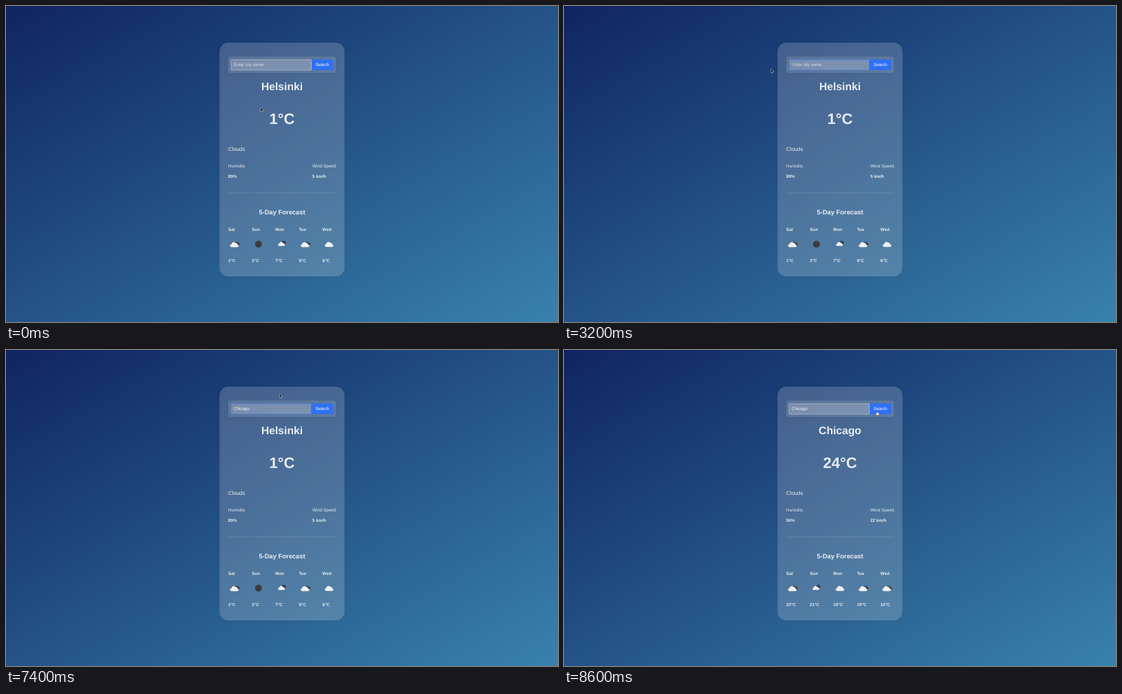
These frames come from a looping animation (800x458 px, 10 s). An HTML page:

```html
<!DOCTYPE html>
<html lang="en">
<head>
<meta charset="utf-8">
<title>Weather search</title>
<style>
  html, body { margin: 0; width: 100%; height: 100%; overflow: hidden; }
  body { background: linear-gradient(to bottom right, #0f2461, #245387 50%, #3882ac); }
  svg { display: block; width: 800px; height: 458px; }
  text {
    font: 6.27px "Liberation Sans", Arial, Helvetica, sans-serif;
    fill: #fff; fill-opacity: .87; text-rendering: geometricPrecision;
  }
  .b { font-weight: 700; }
  .mid { text-anchor: middle; }
  .card { fill: #fff; fill-opacity: .19; }
  .shade { filter: drop-shadow(0 1.6px 3px rgba(0, 0, 0, .13)); }
  .bar { filter: drop-shadow(0 1px 1.5px rgba(0, 0, 0, .28)); }
</style>
</head>
<body>
<svg viewBox="0 0 800 458">
  <defs>
    <path id="puff" d="M-3.9 3.9C-7 3.9-7.2-.1-4.2-.3C-4-3.3-.4-4.4 1.1-2.1C2.8-2.7 4.2-1.4 4-.1C6.8.2 6.5 3.9 3.9 3.9Z"/>
    <g id="cloud"><use href="#puff" fill="#f2f2f2"/></g>
    <g id="broken">
      <use href="#puff" fill="#3c3c40" transform="translate(3 -1.3) scale(.68)"/>
      <use href="#puff" fill="#f2f2f2" transform="translate(-.7 .2)"/>
    </g>
    <g id="few">
      <circle cx="2.6" cy="-2.2" r="2.9" fill="#3c3c40"/>
      <use href="#puff" fill="#f2f2f2" transform="translate(-.7 -.6) scale(.8)"/>
    </g>
    <circle id="clear" r="5" fill="#3c3c40"/>
  </defs>

  <g id="main">
    <rect class="card shade" x="309.5" y="53.3" width="181" height="338.7" rx="12.5"/>
    <rect class="bar" x="322" y="73.3" width="156" height="23.6" rx="3.2" fill="#fff" fill-opacity=".13"/>
    <rect x="326" y="77.7" width="117" height="15.4" rx="1.5" fill="#fff" fill-opacity=".19"/>
    <rect id="edge" x="326" y="77.8" width="116.6" height="15.2" rx="1.5" fill="none" stroke="#fff" stroke-opacity=".5" stroke-width=".7"/>
    <rect id="focus" x="326.3" y="78" width="116" height="14.8" rx="1" fill="none" stroke="#4a7cf2" stroke-width=".7"/>
    <rect id="button" x="443" y="77.6" width="31" height="15.4" rx="1.6" fill="#2f71f4"/>
    <text class="mid" x="458.4" y="87.3" style="fill-opacity:1">Search</text>
    <text id="entry" x="330" y="87.3"></text>
    <rect id="caret" y="81.6" width=".8" height="7.4" fill="#4780f5"/>
    <text x="322" y="210" style="font-size:7.84px">Clouds</text>
    <text x="322" y="233.6">Humidity</text>
    <text x="444" y="233.6">Wind Speed</text>
    <path d="M322 271H478" stroke="#fff" stroke-opacity=".17" stroke-width=".8"/>
    <text class="b mid" x="400" y="301.8" style="font-size:9.4px">5-Day Forecast</text>
  </g>

  <g id="loading">
    <rect class="card shade" x="309.5" y="205.8" width="181" height="34" rx="12.5"/>
    <text x="322" y="224.7">Loading...</text>
  </g>

  <g id="cursor">
    <path id="arrow" d="M0 0V5.3L1.3 4.2L2.2 6.1L3.2 5.6L2.3 3.8L4 3.7Z" fill="#000" stroke="#fff" stroke-width=".45"/>
    <path id="beam" d="M-1.3-4.2Q0-4.2 0-3.4V3.4Q0 4.2-1.3 4.2M1.3-4.2Q0-4.2 0-3.4M0 3.4Q0 4.2 1.3 4.2" fill="none" stroke="#d3d9e4" stroke-width=".5"/>
    <path id="hand" d="M-1-2.7Q-.4-3.4.1-2.6V-.7L2.4-.2Q3.1.1 2.9 1L2.3 3.3H-.8L-2.4.9Q-2.4-.1-1.4.4L-1 .7Z" fill="#fff" stroke="#111" stroke-width=".4"/>
  </g>
</svg>

<script>
const $ = id => document.getElementById(id);
const show = (id, on) => { $(id).style.display = on ? '' : 'none'; };
const clamp = v => Math.min(1, Math.max(0, v));
const ease = v => v * v * (3 - 2 * v);

const LOOP = 10000, STEP = 100;
const WORD = 'Chicago';
const KEYS = [4700, 5100, 5300, 5600, 5900, 6200, 6400];
const FOCUS = 1200, BLUR = 7900, FADE = 300, LOAD = 8400, DONE = 8600;

// start, end, from, control, to
const MOVES = [
  [0, 900, [369, 147.6], [372, 105], [359, 83]],
  [2000, 2600, [359, 83], [328, 84], [300, 91.4]],
  [6700, 7800, [300, 91.4], [350, 25], [454, 91.4]]
];

const DAYS = ['Sat', 'Sun', 'Mon', 'Tue', 'Wed'];
const CITIES = [
  { id: 'before', name: 'Helsinki', temp: 1, humid: 89, wind: 5,
    days: [1, 3, 7, 6, 6], icons: ['broken', 'clear', 'few', 'broken', 'cloud'] },
  { id: 'after', name: WORD, temp: 24, humid: 56, wind: 22,
    days: [22, 21, 15, 19, 10], icons: ['broken', 'few', 'cloud', 'broken', 'broken'] }
];

const bold = (x, y, s) => `<text class="b" x="${x}" y="${y}">${s}</text>`;
const title = (y, size, s) =>
  `<text class="b mid" x="400" y="${y}" style="font-size:${size}px">${s}</text>`;

function cityMarkup(c) {
  const days = DAYS.map((day, i) => {
    const x = 322 + i * 34.15;
    return bold(x, 326.4, day) + bold(x, 370.5, c.days[i] + '°C') +
      `<use href="#${c.icons[i]}" x="${x + 9.8}" y="345.3"/>`;
  });
  return `<g id="${c.id}">` + title(121.8, 15.68, c.name) + title(170.6, 21.95, c.temp + '°C') +
    bold(322, 249.4, c.humid + '%') + bold(444, 249.4, c.wind + ' km/h') + days.join('') + '</g>';
}
$('main').insertAdjacentHTML('beforeend', CITIES.map(cityMarkup).join(''));

function cursorAt(t) {
  const [a, b, p, c, q] = MOVES.filter(m => t >= m[0]).pop();
  const k = ease(clamp((t - a) / (b - a)));
  return [0, 1].map(i => (1 - k) ** 2 * p[i] + 2 * k * (1 - k) * c[i] + k * k * q[i]);
}

function caretAlpha(t) {
  if (t < FOCUS || t >= BLUR) return 0;
  const typing = t >= KEYS[0];
  if (typing && t < KEYS[6] + 400) return 1;
  const phase = (t - (typing ? 6300 : FOCUS)) % 1000;
  return phase < 500 ? 1 : phase < 600 ? .5 : phase < 900 ? 0 : .5;
}

function draw(time) {
  const t = Math.floor(time / STEP) * STEP;
  const busy = t >= LOAD && t < DONE;
  show('main', !busy);
  show('loading', busy);
  show('before', t < DONE);
  show('after', t >= DONE);

  const typed = WORD.slice(0, KEYS.filter(k => t >= k).length);
  $('entry').textContent = typed || 'Enter city name';
  $('entry').style.fillOpacity = typed ? .95 : .72;

  const focus = clamp((t - FOCUS + STEP) / (FADE + STEP)) - clamp((t - BLUR + STEP) / (FADE + STEP));
  $('focus').style.opacity = focus;
  $('edge').style.opacity = 1 - focus;
  $('button').setAttribute('x', 443 - focus * .7);
  $('button').setAttribute('width', 31 + focus * .7);

  $('caret').setAttribute('x', typed ? 330.2 + $('entry').getComputedTextLength() : 330.4);
  $('caret').style.opacity = caretAlpha(t);

  const [x, y] = cursorAt(t);
  const inRow = y > 77 && y < 93.5;
  const overInput = inRow && x > 326 && x < 442;
  const overButton = inRow && x >= 442;
  show('cursor', t < KEYS[0] || t >= 6800);
  show('beam', overInput);
  show('hand', overButton);
  show('arrow', !overInput && !overButton);
  $('cursor').setAttribute('transform', `translate(${x} ${y})`);
}

const start = performance.now();
function tick() {
  draw((performance.now() - start) % LOOP);
  requestAnimationFrame(tick);
}
tick();
</script>
</body>
</html>
```
